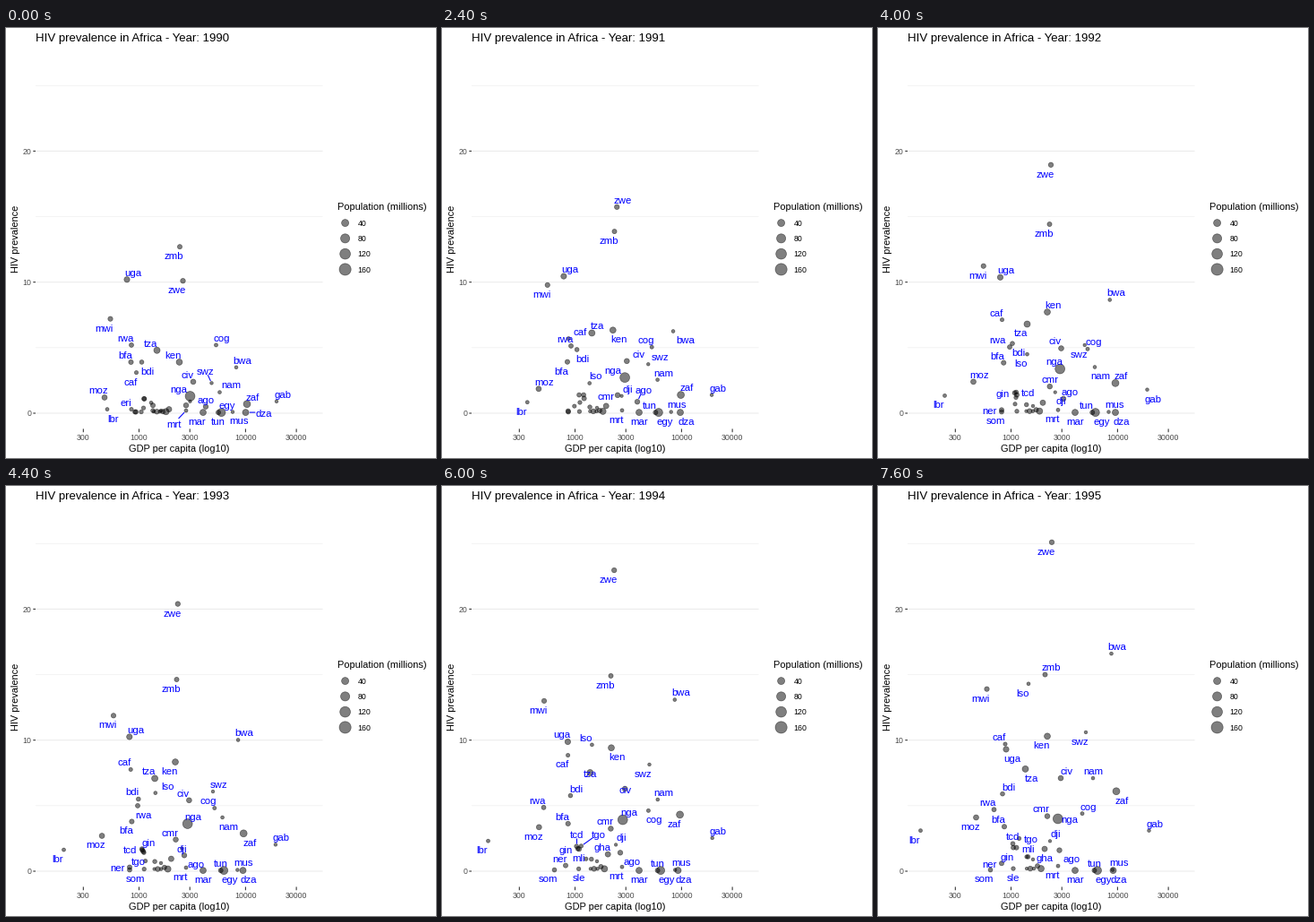
A matplotlib script for the animation above (8000 ms loop, 480 px wide and 480 px high).

```python
import math

import matplotlib.pyplot as plt
import numpy as np
from matplotlib.animation import FuncAnimation
from matplotlib.collections import LineCollection

plt.rcParams["font.family"] = "Liberation Sans"

SIZE, DPI = 480, 72  # one point equals one pixel
LEFT, RIGHT, BOTTOM = 33, 353.5, 448.5
YEARS = 5

fig = plt.figure(figsize=(SIZE / DPI, SIZE / DPI), dpi=DPI, facecolor="white")
ax = fig.add_axes([0, 0, 1, 1])
ax.set_xlim(0, SIZE)
ax.set_ylim(SIZE, 0)
ax.axis("off")


def x_of(gdp):
    return 148.5 + 118.9 * (math.log10(gdp) - 3)


def y_of(hiv):
    return 430 - 14.63 * hiv


def radius(pop):
    return 0.354 + 1.067 * (1 + 5 * math.sqrt(pop / 172))


def write(x, y, text, size, color="black", **kw):
    return ax.text(x, y, text, fontsize=size, color=color, va="baseline", **kw)


def rule(xs, y, color, width):
    ax.plot(xs, [y, y], color=color, lw=width, solid_capstyle="butt",
            snap=False, zorder=1)


def dots(xs, ys, pops):
    return ax.scatter(xs, ys, s=[(2 * radius(p)) ** 2 for p in pops],
                      facecolors=(0, 0, 0, 0.5), edgecolors=(0, 0, 0, 0.5),
                      linewidths=0.7, zorder=3)


class Country:
    """x runs through evenly spaced knots; prevalence bends from start to end.

    sides: label direction per layout, the last one repeating. A repeated
    letter pushes the label further out, "o" centres it and "-" hides it.
    """

    def __init__(self, name, pop, knots, start, end, bow=0, sides="-"):
        self.name, self.pop, self.knots = name, pop, knots
        self.start, self.end, self.bow = start, end, bow
        self.sides = sides.split()

    def spot(self, t):
        u = t / YEARS
        x = np.interp(u, np.linspace(0, 1, len(self.knots)), self.knots)
        hiv = self.start + (self.end - self.start) * u + self.bow * 4 * u * (1 - u)
        return x, y_of(hiv)

    def offset(self, layout):
        side = self.sides[min(layout, len(self.sides) - 1)]
        if side == "-":
            return None
        across = side.count("E") - side.count("W")
        down = side.count("S") - side.count("N")
        return 6.6 * across, 0.9 + (math.copysign(4, down) + 5 * down if down else 0)


countries = [
    Country("zwe", 10.5, [197.5, 195, 191, 194], 10.1, 25.1, 1.35, "SW NE SW"),
    Country("zmb", 8, [194, 191.5, 186.5], 12.7, 15, 0.57, "SW SW SW SW SW SW NE"),
    Country("uga", 18, [135, 136.5, 143], 10.2, 9.3, 0.62, "NE NE NE NE NW NE SE"),
    Country("mwi", 9.5, [116.5, 120, 115.5, 120, 114, 121.5], 7.2, 13.9, 0.68, "SW"),
    Country("rwa", 7, [140, 141, 147, 147, 113.5, 129.5], 5.2, 4.7, 0.1,
            "NW NW NWW SE NW"),
    Country("bdi", 5.6, [151.5, 150, 139], 3.9, 5.9, 0.42, "SE SE SE NW NE"),
    Country("caf", 3, [145.5, 138.5, 142], 3.1, 9.7, 0.73, "SW NEE NW NW SW SW NW"),
    Country("bfa", 9, [139.5, 141], 3.9, 3.4, 0.2, "NW SW NW SW NW"),
    Country("tza", 26, [168.5, 164.5], 4.8, 7.8, 0.5, "NW NE SW NW o SW SE"),
    Country("ken", 24, [193.5, 189, 189], 3.9, 10.3, 0.62, "NW SE NE SW SE SW"),
    Country("cog", 2.4, [234.5, 234, 228], 5.2, 4.4, 0.1, "NE NW NE NW SE NE"),
    Country("bwa", 1.4, [257, 260.5], 3.5, 16.6, -1.4, "NE SEE NE"),
    Country("civ", 13, [209, 204.5, 204], 2.4, 7.1, 0.2, "NW NEE NW NW o NE"),
    Country("swz", 0.9, [229.5, 232], 2.3, 10.6, -1.25, "NNW NEE SW NE SW"),
    Country("nam", 1.4, [238.5, 242, 240], 1.6, 7.1, -0.83, "NEE NE SE SE NE NE N"),
    Country("nga", 97, [205.5, 200.8], 1.3, 4, 0.73, "NWW NWW NW NE NE NE EE"),
    Country("ago", 11, [223, 221, 215, 199, 199, 202.5], 0.5, 1.6, 0.05,
            "N NNE NE SEE"),
    Country("cmr", 12, [201, 195.5, 188, 189], 0.6, 4.2, -0.36, "- WW N NW"),
    Country("dji", 0.6, [205.5, 200, 195.5, 192], 0.9, 2.3, 0, "- NE SE o NE"),
    Country("zaf", 38, [269, 265, 266], 0.7, 6.1, -1.1, "NE NE NE SE SW SW SE"),
    Country("gab", 1, [302, 300.5, 302.5], 0.9, 3.1, -0.2, "NE NE SE NE"),
    Country("moz", 14, [110, 106.5, 109.5], 1.2, 4.1, -0.25, "NW NE NE SW"),
    Country("lbr", 2, [113, 106, 84.5, 64.5, 51.5, 47.5], 0.3, 3.1, -0.36, "SE SW"),
    Country("mrt", 2, [201], 0.2, 0.4, -0.05, "SSWW SW"),
    Country("mar", 25, [220], 0.06, 0.06, 0, "SW S"),
    Country("egy", 57, [240.5, 245], 0.06, 0.06, 0, "NE SE"),
    Country("tun", 8, [237, 241.5], 0.06, 0.06, 0, "S NW NW N"),
    Country("mus", 1, [253, 262], 0.1, 0.1, 0, "SE NE"),
    Country("dza", 26, [267.5, 262.5], 0.06, 0.06, 0, "EEE SE"),
    Country("lso", 1.6, [162, 166.5, 168], 0.8, 14.3, -3.05, "- NE SW NEE NW SW"),
    Country("gin", 6.5, [154, 151], 1.1, 1.8, 0.1, "- - WW NE WW WWW SW"),
    Country("tcd", 6, [154.5, 158.5, 150, 150.5], 1.1, 2.1, 0, "- - EE WW NN NW N"),
    Country("tgo", 3.9, [153.5, 154, 154, 157.5], 0.4, 2.5, -0.25,
            "- - - SW NNEEE NNE EE"),
    Country("mli", 8.5, [164, 158, 152, 154.5], 0.6, 1.8, 0.2, "- - - - S SS EE"),
    Country("gha", 15.5, [182, 186], 0.3, 1.7, -0.2, "- - - - NW NW S"),
    Country("ner", 8, [145, 138, 138], 0.1, 0.6, -0.1, "- - WW WW NW WW"),
    Country("som", 6.3, [144, 144, 138, 138, 125.5, 125.5], 0.1, 0.1, 0,
            "- - SW SE SW"),
    Country("sle", 4, [151, 155, 151], 0.1, 0.2, 0, "- - - - S"),
    Country("eri", 3.2, [140, 166], 0.3, 1.1, 0, "NW -"),
    Country("ben", 5, [164, 167.5], 0.2, 1.1),
    Country("gmb", 1, [173], 0.2, 0.9),
]
# Unnamed points near zero
for i, pop in enumerate((0.5, 11, 1, 7.5, 26)):
    countries.append(Country("", pop, [165 + 3.4 * i, 166 + 4 * i], 0.12, 0.2 + 0.2 * (i == 3)))

# Grid, axes and captions
for hiv in range(0, 26, 5):
    major = hiv % 10 == 0
    rule([LEFT, RIGHT], y_of(hiv), "#ebebeb", 1.07 if major else 0.53)
    if major:
        rule([LEFT - 2.7, LEFT], y_of(hiv), "#333333", 1.07)
        write(28, y_of(hiv) + 3.2, str(hiv), 8.8, "#4d4d4d", ha="right")
for gdp in (300, 1000, 3000, 10000, 30000):
    ax.plot([x_of(gdp)] * 2, [BOTTOM - 0.5, BOTTOM + 2.2], color="#333333",
            lw=1.07, snap=False, zorder=1)
    write(x_of(gdp), 460, str(gdp), 8.8, "#4d4d4d", ha="center")

title = write(33, 15, "", 13.2)
write(193, 473, "GDP per capita (log10)", 11, ha="center")
ax.text(16.3, 235.5, "HIV prevalence", fontsize=11, rotation=90,
        ha="right", va="center")
write(370, 203, "Population (millions)", 11)
keys = (40, 80, 120, 160)
key_ys = [217.6 + 17.28 * i for i in range(len(keys))]
dots([378.6] * len(keys), key_ys, keys)
for pop, y in zip(keys, key_ys):
    write(392.7, y + 3.2, str(pop), 8.8)

# Moving parts
points = dots([0] * len(countries), [0] * len(countries), [c.pop for c in countries])
names = [write(0, 0, c.name, 11.4, "blue", ha="center", zorder=5) for c in countries]
leaders = LineCollection([], colors="blue", linewidths=1.07, zorder=4)
ax.add_collection(leaders)


def leader(x, y, r, dx, dy):
    """Line from a far label's box to the rim of its point, or None."""
    dy -= 1
    half_w, half_h = 9, 5
    if math.hypot(max(abs(dx) - half_w, 0), max(abs(dy) - half_h, 0)) <= 8.2:
        return None
    box = min(half_w / max(abs(dx), 0.01), half_h / max(abs(dy), 0.01))
    rim = (r + 0.8) / math.hypot(dx, dy)
    return [(x + dx * (1 - box), y + dy * (1 - box)), (x + dx * rim, y + dy * rim)]


def clock(i):
    """Each year holds three ticks, with one halfway tick between years."""
    year, phase = divmod(i + 2, 4)
    return year - 0.5 if phase == 0 else year


def draw(i):
    t = clock(i)
    # Labels keep their sides halfway, except for the last step
    layout = int(t) if t < 4.5 else int(2 * t) - 4
    title.set_text(f"HIV prevalence in Africa - Year: {1990 + int(t)}")
    spots, lines = [], []
    for country, text in zip(countries, names):
        x, y = country.spot(t)
        spots.append((x, y))
        offset = country.offset(layout)
        text.set_visible(offset is not None)
        if offset:
            dx, dy = offset
            text.set_position((x + dx, y + dy + 4))
            line = leader(x, y, radius(country.pop), dx, dy)
            if line:
                lines.append(line)
    points.set_offsets(spots)
    leaders.set_segments(lines)
    return [title, points, leaders, *names]


anim = FuncAnimation(fig, draw, frames=20, interval=400, repeat=True,
                     repeat_delay=0, blit=False)
plt.show()
```
